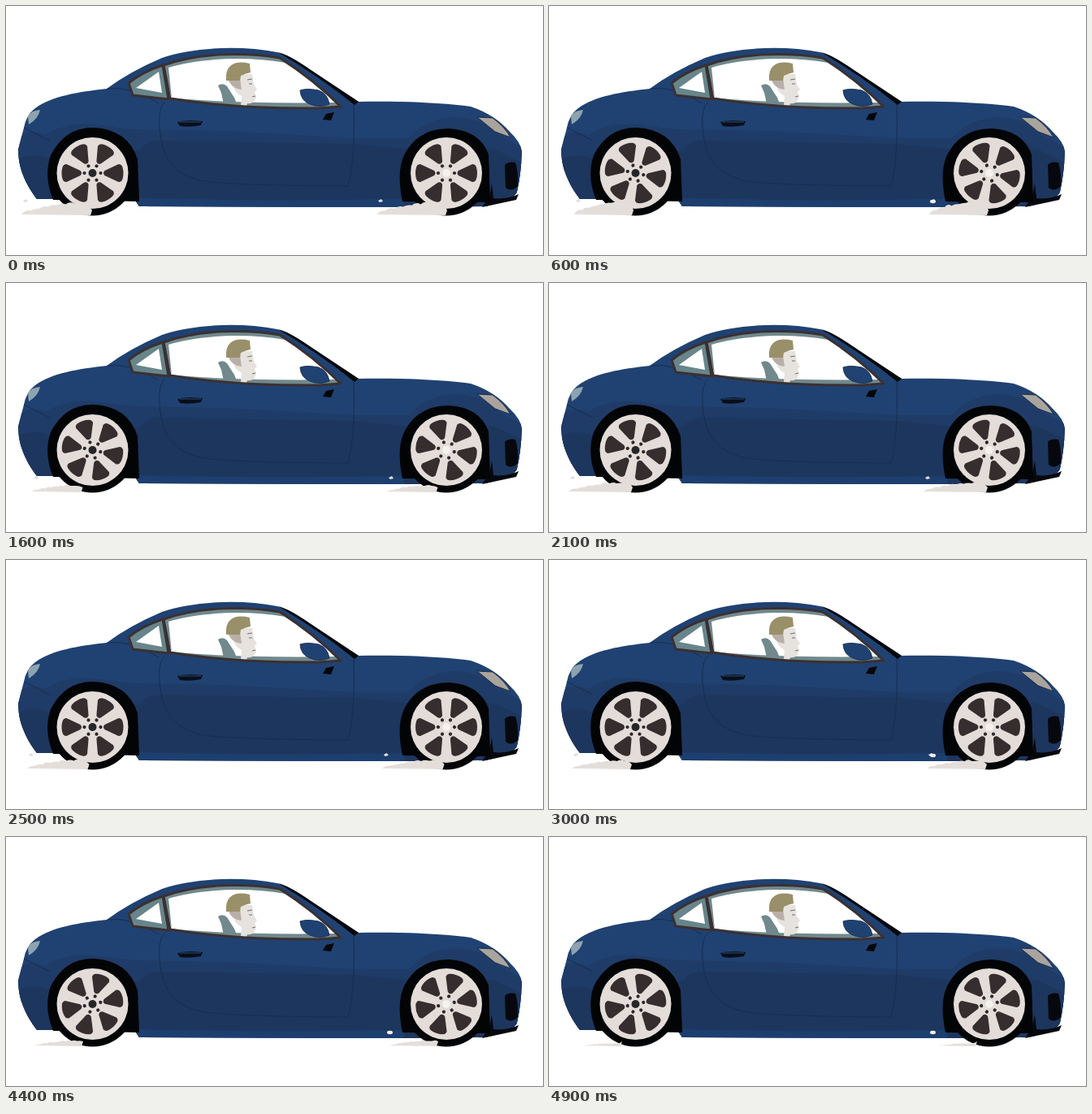
Recreate the animation shown at these times as an HTML page. Size 661 px wide and 307 px high, loop 5000 ms.

```html
<!DOCTYPE html>
<html lang="en">
<head>
<meta charset="utf-8">
<title>Driving car</title>
<style>
html, body { margin: 0; width: 100%; height: 100%; overflow: hidden; background: #fff; }
svg { display: block; width: 100vw; height: 100vh; }
.seam { fill: none; stroke: #172d50; stroke-width: 1; }
.frame { fill: none; stroke: #3a3032; stroke-width: 3; stroke-linejoin: round; }
.glass { fill: #71898c; }
.smoke { fill: #e4deda; }
</style>
</head>
<body>
<svg viewBox="0 0 661 307">
  <defs>
    <path id="hole" d="M-3-15L-11-32Q-11-36-7-37Q0-39 7-37Q11-36 11-32L3-15Q0-12-3-15Z"/>
    <clipPath id="shell"><path id="outline" d="M38 238C29 226 15 205 15 177L22 150Q25 134 36 126C57 111 88 106 124 102Q152 81 192 64C230 51 288 48 334 57Q350 62 376 80L434 118C482 117 536 119 572 124Q602 134 620 155Q634 168 635 180Q634 207 629 229Q627 238 590 247L487 248L164 247L158 238Z"/></clipPath>
  </defs>

  <g clip-path="url(#shell)">
    <rect width="661" height="307" fill="#204272"/>
    <path d="M10 172Q22 148 48 159Q76 141 116 147Q144 151 160 152L270 154L430 163H496Q516 139 552 137Q588 138 606 158L640 177V260H10Z" fill="#1f3b67"/>
    <path d="M10 192Q30 177 60 190L165 178Q174 164 193 166L430 170L490 176L600 176L640 195V260H10Z" fill="#1d365e"/>
    <path d="M160 237Q310 241 490 238V250H160Z" fill="#1d3f6f"/>
    <path d="M124 102Q155 98 188 120M22 150L54 166" class="seam"/>
  </g>

  <path d="M194 73C238 57 296 57 337 64Q379 91 412 124L385 126Q280 127 202 114Z" fill="#fff"/>
  <path class="glass" d="M194 73C238 57 296 57 337 64L344 70C293 61 236 65 200 76L204 114Z"/>
  <path class="glass" d="M203 113Q280 121 409 119L412 125Q302 130 202 115Z"/>
  <path class="glass" d="M261 98Q267 94 272 99L281 113L285 123L268 121L265 107Z"/>

  <g id="driver">
    <path d="M288 84L303 84L305 97L309 103L306 106L308 112L305 118Q301 121 297 120L296 124L289 122L290 111Q279 105 280 96Z" fill="#e6e2dd"/>
    <path d="M273 89L288 89L290 103Q277 102 273 89Z" fill="#b9afa9"/>
    <path d="M271 92Q270 79 276 74Q284 67 300 71L301 82Q295 83 289 86L288 92Z" fill="#999069"/>
    <path d="M297 91L303 90M299 96L303 96M303 112L307 111" fill="none" stroke="#776d68"/>
  </g>

  <path class="frame" d="M194 73C238 57 296 57 337 64Q379 91 412 124L385 126Q280 127 202 114Z"/>
  <path class="frame" d="M151 95Q168 81 193 73L200 115L156 110Z" style="fill:#67858a"/>
  <path d="M160 101L188 81L192 107Z" fill="#fff"/>
  <path d="M335 57Q348 60 374 78L434 118L429 122Q386 87 335 57Z" fill="#05070b"/>
  <path d="M362 104Q370 101 385 104Q396 108 398 121Q386 126 374 121Q363 117 362 104Z" fill="#204273" stroke="#193456"/>
  <path d="M390 140L394 133L404 131L400 141Z" fill="#05070b"/>
  <path d="M211 143Q220 140 242 142L240 147Q225 150 214 148Z" fill="#080e19"/>
  <path d="M213 143H240" stroke="#294a76"/>
  <path class="seam" d="M196 118Q187 125 189 150C192 188 206 207 239 215Q266 221 421 222Q430 188 428 122"/>

  <path d="M27 136Q30 129 42 128Q40 139 28 146Z" fill="#8ca3b0"/>
  <path d="M580 137L599 138Q614 149 621 162L602 155Z" fill="#aaa49e" stroke="#182b43"/>
  <path d="M614 196Q618 191 627 193Q631 205 630 222Q622 230 615 224Z" fill="#06080d"/>
  <path d="M598 219L600 237Q616 239 631 232L628 239L586 248L595 235Z" fill="#06080d"/>

  <path d="M58 239Q46 210 55 184Q73 149 108 150Q150 152 162 189L164 241Z" fill="#030405"/>
  <path d="M488 241Q480 202 491 182Q508 151 545 151Q583 153 594 183L596 242Z" fill="#030405"/>
  <path d="M90 157Q109 150 126 160M526 158Q548 153 565 161" fill="none" stroke="#24272a"/>

  <g id="wheels"></g>
  <path class="smoke" id="rear"/>
  <path class="smoke" id="front" transform="translate(437 0)"/>
  <ellipse id="spark" cx="472.5" cy="241" rx="3.5" ry="2.2" fill="#f2efec"/>
</svg>
<script>
const get = id => document.getElementById(id);
const NS = "http://www.w3.org/2000/svg";

function add(parent, tag, attrs) {
  const el = document.createElementNS(NS, tag);
  for (const key in attrs) el.setAttribute(key, attrs[key]);
  return parent.appendChild(el);
}

function makeWheel(x, y, hub) {
  const wheel = add(get("wheels"), "g", { transform: `translate(${x} ${y})` });
  add(wheel, "circle", { r: 52.5, fill: "#030405" });
  add(wheel, "circle", { r: 44, fill: "#e3dcd8" });
  const spin = add(wheel, "g", {});
  for (let i = 0; i < 6; i++) {
    add(spin, "use", { href: "#hole", fill: "#352d2e", transform: `rotate(${i * 60 + 30})` });
    const a = i * Math.PI / 3;
    add(spin, "circle", { cx: 10 * Math.cos(a), cy: 10 * Math.sin(a), r: 2.1, fill: "#29282a" });
  }
  add(wheel, "circle", { r: 5, fill: hub });
  return spin;
}

const spins = [makeWheel(106.5, 206, "#242628"), makeWheel(542, 206, "#f4f1ef")];

// step, left edge, right edge, height
const puffs = [
  [0, 19, 106, 17], [6, 31, 104, 19], [11, 40, 86, 6], [21, 24, 103, 13],
  [30, 28, 102, 12], [38, 29, 101, 12], [49, 41, 90, 4], [50, 19, 106, 17]
];

function puffAt(step) {
  const i = puffs.findIndex(p => p[0] > step) - 1;
  const [a, b] = [puffs[i], puffs[i + 1]];
  const u = (step - a[0]) / (b[0] - a[0]);
  return a.map((v, k) => v + (b[k] - v) * u);
}

function noise(n) {
  const s = Math.sin(n * 12.9898) * 43758.5453;
  return s - Math.floor(s);
}

function smokePath(step, seed) {
  const [, left, right, height] = puffAt(step);
  const count = 8, w = (right - left) / count;
  let d = `M${left} 257`;
  for (let i = 0; i < count; i++) {
    const u = (i + 1) / count;
    const rise = height * (0.2 + 0.8 * Math.sin(Math.PI * 0.6 * u));
    const end = i === count - 1 ? 252 : 258 - rise * 0.85;
    const top = 258 - rise * (0.85 + 0.3 * noise(step * 9 + i + seed));
    d += `Q${left + (i + 0.5) * w} ${top} ${left + u * w * count} ${end}`;
  }
  d += `L${right - 2} 258Z`;
  if (height > 9) d += `M${left + 2} 240l4-2 2 3-4 1z`;
  return d;
}

function draw(now) {
  const step = Math.floor(now % 5000 / 100);
  for (const spin of spins) spin.setAttribute("transform", `rotate(${step * 12})`);
  get("rear").setAttribute("d", smokePath(step, 1));
  get("front").setAttribute("d", smokePath(step, 40));
  const lit = step > 2 && (step < 16 || step > 25);
  get("spark").style.display = lit ? "" : "none";
}

const start = performance.now();
function tick() {
  draw(performance.now() - start);
  requestAnimationFrame(tick);
}
tick();
</script>
</body>
</html>
```
